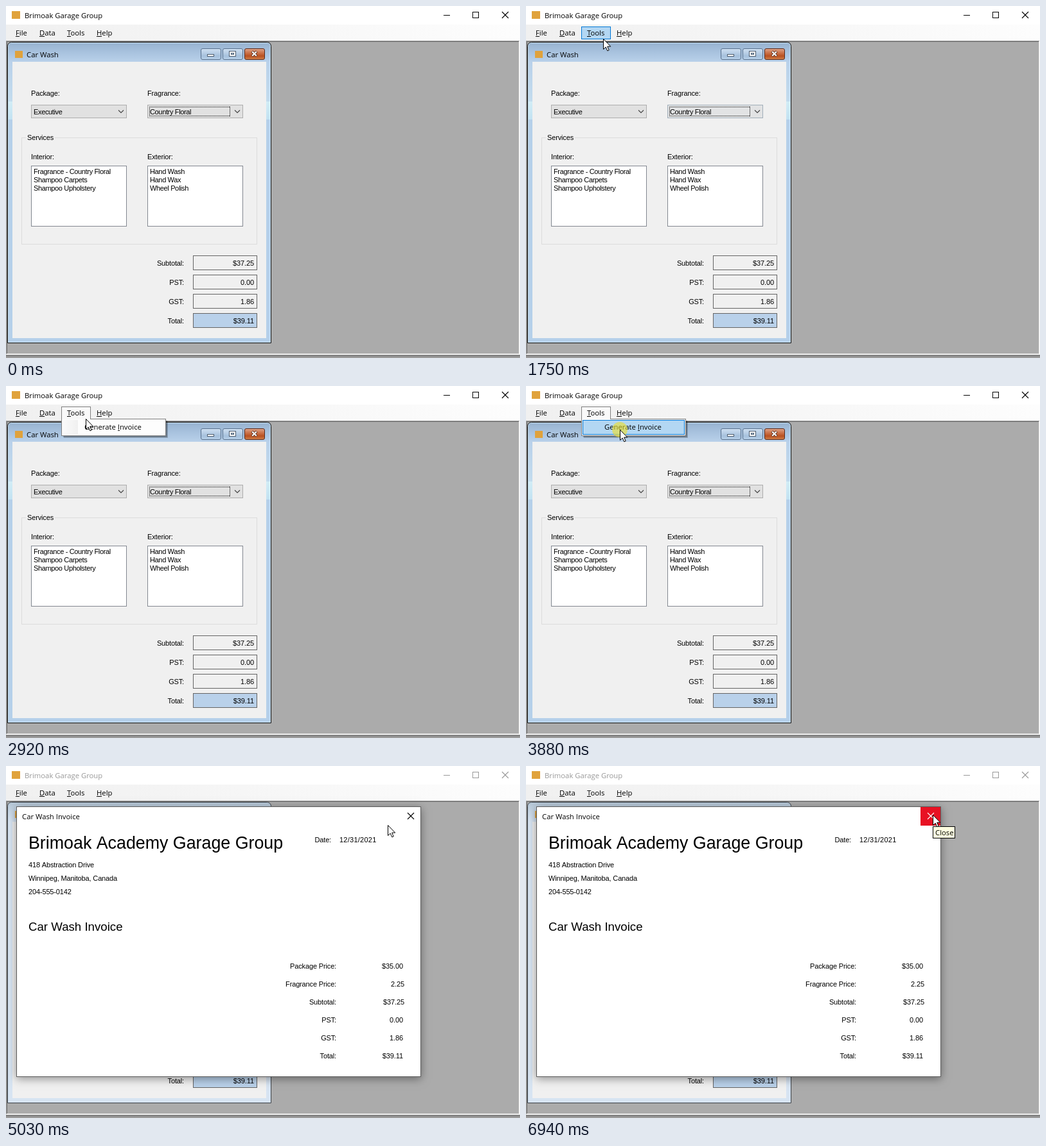
Write an HTML page with a canvas that moves like this. It is 800 px wide and 549 px high and loops after 8000 ms.

```html
<!DOCTYPE html>
<html lang="en">
<head>
<meta charset="utf-8">
<title>Car Wash Invoice</title>
<style>
html, body { margin: 0; width: 100%; height: 100%; overflow: hidden; background: #ababab; }
canvas { display: block; width: 800px; height: 549px; }
</style>
</head>
<body>
<canvas id="stage" width="800" height="549"></canvas>
<script>
const c = document.getElementById('stage').getContext('2d');
const LOOP = 8000, STEP = 70;
const COMPANY = 'Brimoak Garage Group';
const SCHOOL = 'Brimoak Academy Garage Group';
const UI = '11.3px "Open Sans", "Noto Sans", sans-serif';
const sans = px => px + 'px "Liberation Sans", Arial, sans-serif';

// Pointer moves: start time, then [step, x, y] stops.
const MOVES = [
  [910, [[0, 788, 297], [3, 420, 205], [6, 225, 146], [10, 148, 82], [11, 126, 56]]],
  [1750, [[0, 120, 51], [4, 112, 46], [9, 114, 43]]],
  [2780, [[0, 116, 45], [8, 146, 68]]],
  [4010, [[0, 580, 95], [2, 590, 94]]],
  [5030, [[0, 594, 92], [7, 633, 76]]]
];

function pointer(t) {
  const move = MOVES.filter(m => m[0] <= t).pop();
  if (!move) return null;
  const stops = move[1];
  const k = Math.min(Math.floor((t - move[0]) / STEP), stops[stops.length - 1][0]);
  const i = Math.max(1, stops.findIndex(s => s[0] >= k));
  const [a, b] = [stops[i - 1], stops[i]];
  const u = (k - a[0]) / (b[0] - a[0]);
  return { x: Math.round(a[1] + (b[1] - a[1]) * u), y: Math.round(a[2] + (b[2] - a[2]) * u) };
}

function rect(x, y, w, h, fill) {
  c.fillStyle = fill;
  c.fillRect(x, y, w, h);
}

function box(x, y, w, h, fill, edge) {
  if (fill) rect(x, y, w, h, fill);
  c.strokeStyle = edge;
  c.lineWidth = 1;
  c.strokeRect(x + .5, y + .5, w - 1, h - 1);
}

function line(pts, color, width = 1) {
  c.beginPath();
  pts.forEach(p => c.lineTo(p[0], p[1]));
  c.strokeStyle = color;
  c.lineWidth = width;
  c.stroke();
}

function cross(x, y, r, color, width = 1.1) {
  line([[x - r, y - r], [x + r, y + r]], color, width);
  line([[x - r, y + r], [x + r, y - r]], color, width);
}

function fade(x0, y0, x1, y1, ...colors) {
  const g = c.createLinearGradient(x0, y0, x1, y1);
  colors.forEach((col, i) => g.addColorStop(i / (colors.length - 1), col));
  return g;
}

function text(s, x, y, { font = sans(11), color = '#000', align = 'left', gap = 0 } = {}) {
  c.font = font;
  c.fillStyle = color;
  c.textAlign = align;
  c.letterSpacing = gap + 'px';
  c.fillText(s, x, y);
}

const label = (s, x, y, align) => text(s, x, y, { align, gap: -.15 });
const item = (s, x, y) => text(s, x, y, { gap: -.35 });
const number = (s, x, y) => text(s, x, y, { align: 'right', gap: -.1 });

// UI text with one underlined access key.
function menuText(s, x, y, key = 0) {
  text(s, x, y, { font: UI });
  const from = c.measureText(s.slice(0, key)).width;
  const w = c.measureText(s[key]).width;
  rect(Math.round(x + from), y + 1, Math.round(w), 1, '#000');
}

function mainWindow(active) {
  const ink = active ? '#000' : '#999';
  rect(0, 0, 800, 549, '#ababab');
  rect(0, 0, 800, 29, '#fff');
  rect(9, 8, 13, 12, '#e0a23c');
  text(COMPANY, 29, 19, { font: UI, color: ink });
  rect(681, 14, 10, 1, ink);
  box(726, 9, 10, 10, null, ink);
  cross(777, 14, 5, ink);
  rect(0, 29, 800, 25, fade(0, 0, 800, 0, '#f0f0f0', '#fdfdfd'));

  rect(0, 54, 799, 1, '#a0a0a0');
  rect(0, 55, 798, 1, '#696969');
  rect(0, 54, 1, 489, '#a0a0a0');
  rect(1, 55, 1, 487, '#696969');
  rect(798, 55, 1, 488, '#e3e3e3');
  rect(799, 54, 1, 490, '#fff');
  rect(1, 542, 798, 1, '#e3e3e3');
  rect(0, 543, 800, 1, '#fff');
  rect(0, 544, 800, 5, fade(0, 544, 0, 549, '#777', '#a4a4a4'));
}

function menuBar(t) {
  if (t >= 1750 && t < 2450) box(86, 32, 46, 20, '#b3d7f3', '#0078d7');
  if (t >= 2450 && t < 4010) box(86, 32, 46, 20, '#f9f9f9', '#808080');
  [['File', 15], ['Data', 52], ['Tools', 95], ['Help', 141]].forEach(m => menuText(m[0], m[1], 46));
}

function dropDown(p) {
  rect(90, 55, 162, 26, 'rgba(0,0,0,.18)');
  rect(89, 54, 162, 26, 'rgba(0,0,0,.25)');
  box(86, 51, 163, 27, '#fdfdfd', '#808080');
  rect(87, 51, 44, 1, '#f9f9f9');
  rect(87, 53, 25, 23, fade(87, 0, 112, 0, '#fbfbfb', '#f0f0f0'));
  if (p.y > 52) box(88, 53, 159, 23, '#b3d7f3', '#0078d7');
  menuText('Generate Invoice', 122, 68, 9);
}

function captionButton(x, close) {
  const fill = close
    ? fade(0, 66, 0, 84, '#dfa78e', '#cf7a53', '#b9501f', '#d4874f')
    : fade(0, 66, 0, 84, '#cfe0f1', '#bdd2e8', '#a5c0dc', '#bcd5ec');
  c.beginPath();
  c.roundRect(x + .5, 66.5, 31, 17, 2.5);
  c.fillStyle = fill;
  c.fill();
  c.strokeStyle = close ? '#5a2a1c' : '#58708c';
  c.lineWidth = 1;
  c.stroke();
}

function childFrame(active) {
  c.beginPath();
  c.roundRect(2.5, 56.5, 410, 469, [6, 6, 0, 0]);
  c.fillStyle = active ? '#b5d0ea' : '#d7e4f2';
  c.fill();
  c.save();
  c.clip();
  rect(3, 57, 409, 30, active
    ? fade(0, 57, 0, 87, '#97b3d0', '#a8c2de', '#b9d1ea')
    : fade(0, 57, 0, 87, '#b4c6d6', '#c9d8e7', '#d7e4f2'));
  if (active) {
    rect(3, 87, 409, 62, fade(0, 87, 0, 149, '#b9d1ea', '#c3dcee'));
    rect(3, 149, 409, 28, fade(0, 149, 0, 177, '#d2edf6', '#c2e2f2'));
  }
  c.restore();
  c.lineWidth = 1;
  if (active) {
    c.beginPath();
    c.roundRect(3.5, 57.5, 408, 467, [5, 5, 0, 0]);
    c.strokeStyle = 'rgba(215,238,250,.75)';
    c.stroke();
  }
  c.beginPath();
  c.roundRect(2.5, 56.5, 410, 469, [6, 6, 0, 0]);
  c.strokeStyle = active ? '#111' : '#3c4248';
  c.stroke();
  rect(10, 87, 395, 431, '#f0f0f0');

  rect(14, 70, 12, 11, '#e0a23c');
  text('Car Wash', 32, 80, { font: UI });
  captionButton(303);
  captionButton(337);
  captionButton(371, true);
  box(313, 75, 11, 4, '#fff', '#4b5a6c');
  box(347, 70, 11, 9, '#fff', '#4b5a6c');
  box(350, 73, 5, 3, '#b8cee4', '#4b5a6c');
  cross(386.5, 74.5, 3.7, '#5c3425', 4);
  cross(386.5, 74.5, 3.3, '#fff', 2.2);
}

function combo(x, value, hot) {
  box(x, 154, 149, 21, '#e1e1e1', '#adadad');
  if (hot > 0) {
    c.globalAlpha = hot;
    box(x, 154, 149, 21, '#e5f1fb', '#0078d7');
    c.globalAlpha = 1;
  }
  item(value, x + 4, 169);
  line([[x + 136, 162.5], [x + 140, 166.5], [x + 144, 162.5]], '#444', 1.1);
}

// One-pixel dots all the way round, on a checkerboard parity.
function focusRect(x, y, w, h) {
  for (let i = 0; i < w; i += 2) {
    rect(x + i, y, 1, 1, '#000');
    rect(x + i, y + h - 1, 1, 1, '#000');
  }
  for (let j = 0; j < h; j += 2) {
    rect(x, y + j, 1, 1, '#000');
    rect(x + w - 1, y + j, 1, 1, '#000');
  }
}

function list(x, rows) {
  box(x, 249, 149, 95, '#fff', '#828790');
  rows.forEach((r, i) => item(r, x + 4, 262 + 13 * i));
}

function carWash(t, active) {
  childFrame(active);
  label('Package:', 39, 140);
  label('Fragrance:', 220, 140);
  const hot = t > 1190 && t < 1790 ? .5 * Math.sin(Math.PI * (t - 1190) / 600) : 0;
  combo(39, 'Executive', 0);
  combo(220, 'Country Floral', hot);
  focusRect(223, 157, 126, 15);

  box(24, 205, 367, 167, null, '#dcdcdc');
  rect(31, 203, 45, 5, '#f0f0f0');
  label('Services', 33, 209);
  label('Interior:', 39, 239);
  label('Exterior:', 220, 239);
  list(39, ['Fragrance - Country Floral', 'Shampoo Carpets', 'Shampoo Upholstery']);
  list(220, ['Hand Wash', 'Hand Wax', 'Wheel Polish']);

  [['Subtotal:', '$37.25'], ['PST:', '0.00'], ['GST:', '1.86'], ['Total:', '$39.11']].forEach((r, i) => {
    const y = 389 + 30 * i;
    label(r[0], 277, y + 16, 'right');
    box(291, y, 100, 23, i === 3 ? '#b9d1ea' : '#f0f0f0', '#646464');
    number(r[1], 386, y + 16);
  });
}

function invoice(p) {
  c.save();
  c.shadowColor = 'rgba(0,0,0,.4)';
  c.shadowBlur = 13;
  c.shadowOffsetY = 3;
  rect(16, 63, 630, 422, '#fff');
  c.restore();
  box(16, 63, 630, 422, '#fff', '#5c5c5c');
  text('Car Wash Invoice', 25, 83, { font: UI });
  const hot = p.x >= 614 && p.y < 94;
  if (hot) rect(614, 64, 31, 29, '#e81123');
  cross(630, 78, 5, hot ? '#fff' : '#000');

  text(SCHOOL, 35, 129, { font: sans(26.8) });
  label('418 Abstraction Drive', 35, 158);
  label('Winnipeg, Manitoba, Canada', 35, 179);
  label('204-555-0142', 35, 200);
  label('Date:', 506, 119, 'right');
  text('12/31/2021', 519, 119, { gap: .25 });
  text('Car Wash Invoice', 35, 257, { font: sans(18.67) });

  [['Package Price:', '$35.00', 618], ['Fragrance Price:', '2.25', 620], ['Subtotal:', '$37.25', 620],
   ['PST:', '0.00', 618], ['GST:', '1.86', 618], ['Total:', '$39.11', 618]].forEach((r, i) => {
    const y = 316 + 28 * i;
    label(r[0], 514, y, 'right');
    number(r[1], r[2], y);
  });
}

function tooltip(t) {
  if (t < 6800) return;
  c.globalAlpha = Math.min(1, (Math.floor((t - 6800) / STEP) + 1) / 3);
  box(633, 94, 35, 19, '#ffffe1', '#000');
  text('Close', 637, 108, { font: UI });
  c.globalAlpha = 1;
}

function arrow({ x, y }) {
  c.beginPath();
  [[0, 0], [0, 16], [3.7, 12.6], [6.3, 18.4], [8.7, 17.4], [6.2, 11.6], [11.2, 11.6]]
    .forEach(q => c.lineTo(x + .5 + q[0], y + .5 + q[1]));
  c.closePath();
  c.fillStyle = '#fff';
  c.fill();
  c.strokeStyle = '#000';
  c.lineWidth = 1;
  c.stroke();
}

function clickSpot({ x, y }) {
  c.beginPath();
  c.arc(x, y, 12, 0, 7);
  c.fillStyle = 'rgba(236,224,40,.6)';
  c.fill();
}

function draw(t) {
  const p = pointer(t);
  const open = t >= 4010;
  mainWindow(!open);
  menuBar(t);
  carWash(t, !open);
  if (t >= 2450 && !open) dropDown(p);
  if (open) {
    invoice(p);
    tooltip(t);
  }
  if (t >= 2450 && t < 2580 || t >= 3880 && t < 4010) clickSpot(p);
  if (p) arrow(p);
}

const began = performance.now();
function tick() {
  draw((performance.now() - began) % LOOP);
  requestAnimationFrame(tick);
}
tick();
</script>
</body>
</html>
```
